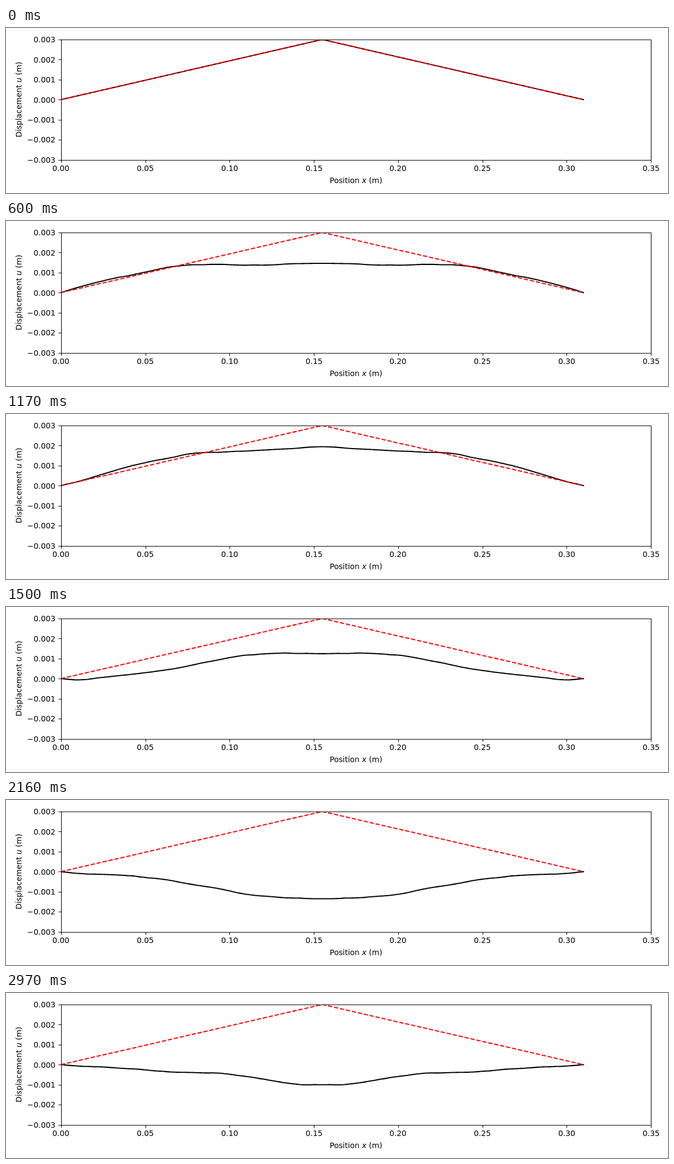
These frames come from a looping animation (1200 by 300 pixels, 3 s). An HTML page:

```html
<!DOCTYPE html>
<html lang="en">
<head>
<meta charset="utf-8">
<title>Plucked string</title>
<style>
  html, body { margin: 0; width: 100%; height: 100%; overflow: hidden; background: #fff; }
  svg { display: block; width: 100vw; height: 100vh; }
  text { font: 13.89px "DejaVu Sans", sans-serif; fill: #000; }
  .it { font-style: italic; }
  .axis { fill: none; stroke: #000; stroke-width: 1.1; }
  .curve { fill: none; stroke-width: 2.08; stroke-linejoin: round; }
</style>
</head>
<body>
<svg viewBox="0 0 1200 300">
  <clipPath id="area"><rect x="100" y="21" width="1070" height="219"/></clipPath>
  <g clip-path="url(#area)">
    <path id="string" class="curve" stroke="#000" stroke-linecap="square"/>
    <path id="start" class="curve" stroke="#f00" stroke-dasharray="7.71 3.33"/>
  </g>
  <path id="axes" class="axis"/>
  <g id="labels"></g>
  <text x="634.5" y="282" text-anchor="middle">Position <tspan class="it">x</tspan> (m)</text>
  <text transform="translate(28 130) rotate(-90)" text-anchor="middle">Displacement <tspan class="it">u</tspan> (m)</text>
</svg>
<script>
const FRAME_MS = 30, FRAMES = 100;
const LENGTH = 0.31, HEIGHT = 3;        // metres, millimetres
const POINTS = 310, TOP_MODE = 199;
const el = id => document.getElementById(id);
const px = x => 99.75 + x * 3055;
const py = u => 130.25 - u * 36.45;
const snap = v => Math.round(v) + 0.5;

// Cycles per frame of the lowest odd modes; stiffness spreads the rest.
const LOW = [0.35656, 0.47826, 0.2884, 0.2065, 0.149, 0.0812];
const modes = [];
for (let n = 1; n <= TOP_MODE; n += 2) {
  const i = (n - 1) / 2;
  modes.push({
    n,
    amp: (i % 2 ? -8 : 8) * HEIGHT / (Math.PI * n) ** 2,
    freq: i < LOW.length ? LOW[i] : 0.0031 * n ** 3 % 1
  });
}

function drawAxes() {
  let d = "M100.5 21.5H1169.5V240.5H100.5Z", labels = "";
  for (let i = 0; i <= 7; i++) {
    const x = px(i * 0.05);
    d += `M${snap(x)} 240v5`;
    labels += `<text x="${Math.round(x - 15.45)}" y="260">${(i * 0.05).toFixed(2)}</text>`;
  }
  for (let i = -3; i <= 3; i++) {
    d += `M100 ${snap(py(i))}h-5`;
    const value = (i < 0 ? "\u2212" : "") + (Math.abs(i) / 1000).toFixed(3);
    labels += `<text x="89.7" y="${Math.round(py(i) + 5.3)}" text-anchor="end">${value}</text>`;
  }
  el("axes").setAttribute("d", d);
  el("labels").innerHTML = labels;
  el("start").setAttribute("d",
    `M${px(0)} ${py(0)}L${px(LENGTH / 2)} ${py(HEIGHT)}L${px(LENGTH)} ${py(0)}`);
}

function drawString(step) {
  const now = modes.map(m => m.amp * Math.cos(2 * Math.PI * m.freq * step));
  const pts = [];
  for (let k = 0; k <= POINTS; k++) {
    const angle = Math.PI * k / POINTS;
    let u = 0;
    modes.forEach((m, i) => { u += now[i] * Math.sin(m.n * angle); });
    pts.push(px(LENGTH * k / POINTS).toFixed(2) + " " + py(u).toFixed(2));
  }
  el("string").setAttribute("d", "M" + pts.join("L"));
}

let shown = -1;
function tick() {
  const step = Math.floor(performance.now() / FRAME_MS) % FRAMES;
  if (step !== shown) drawString(shown = step);
  requestAnimationFrame(tick);
}

drawAxes();
tick();
</script>
</body>
</html>
```
